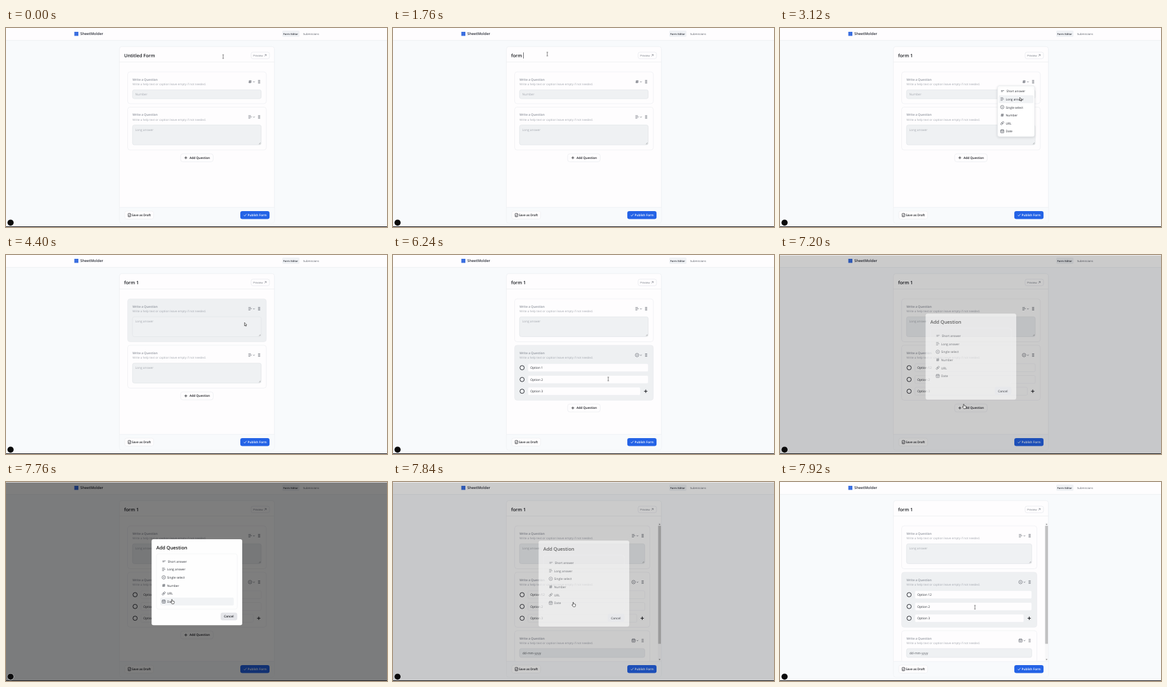
Animation, 600 px wide and 313 px high, one loop 8000 ms. Source, as an HTML page with a canvas:

```html
<!DOCTYPE html>
<html lang="en">
<head>
<meta charset="utf-8">
<title>Form editor</title>
<style>
html, body { margin: 0; width: 100%; height: 100%; overflow: hidden; background: #f8fafc; }
canvas { display: block; width: 600px; height: 313px; }
</style>
</head>
<body>
<canvas id="stage"></canvas>
<script>
const W = 600, H = 313, LOOP = 8000, STEP = 80;
const canvas = document.getElementById('stage');
const c = canvas.getContext('2d');
const ratio = window.devicePixelRatio || 1;
canvas.width = W * ratio;
canvas.height = H * ratio;

const INK = '#16181d', WHITE = '#fefdfe', LINE = '#e9ebef', FIELD = '#eff1f3', HOVER = '#eef0f2';
const TYPES = ['Short answer', 'Long answer', 'Single select', 'Number', 'URL', 'Date'];
const ICONS = ['short', 'long', 'select', 'number', 'link', 'date'];
const HEIGHT = { number: 50, long: 67.5, date: 50 };

// Pointer path: time, x, y, shape from that time on
const PATH = [
  [0, 342, 45, 'beam'], [80, 342, 45, 'beam'], [880, 243, 41, 'beam'],
  [2000, 243, 41, 'beam'], [2160, 262, 50, 'arrow'], [2800, 386, 85, 'hand'],
  [2880, 386, 85, 'arrow'], [3120, 378, 112, 'arrow'], [4400, 376, 109, 'arrow'],
  [4960, 386, 157, 'hand'], [5120, 386, 157, 'arrow'], [5440, 372, 197, 'arrow'],
  [5840, 372, 197, 'arrow'], [6000, 397, 195, 'hand'], [6080, 386, 195, 'beam'],
  [6240, 339, 195, 'beam'], [6480, 250, 178, 'beam'], [6720, 250, 178, 'arrow'],
  [7040, 290, 238, 'hand'], [7280, 290, 238, 'hand'], [7680, 262, 188, 'hand'],
  [7760, 262, 188, 'hand'], [7920, 307, 197, 'beam'], [8000, 307, 197, 'beam']
];

const clamp = v => Math.max(0, Math.min(1, v));
const ease = p => p * p * (3 - 2 * p);

function text(str, x, mid, size, color = INK, weight = 400) {
  c.font = `${weight} ${size}px "Open Sans", "Noto Sans", sans-serif`;
  c.fillStyle = color;
  c.fillText(str, x, mid + size * 0.357);
  return x + c.measureText(str).width;
}

function box(x, y, x2, y2, r, fill, stroke, width = 0.6) {
  c.beginPath();
  c.roundRect(x, y, x2 - x, y2 - y, r);
  if (fill) { c.fillStyle = fill; c.fill(); }
  if (stroke) { c.strokeStyle = stroke; c.lineWidth = width; c.stroke(); }
}

function rect(x, y, w, h, color) {
  c.fillStyle = color;
  c.fillRect(x, y, w, h);
}

function lines(color, width, ...paths) {
  c.strokeStyle = color;
  c.lineWidth = width;
  c.beginPath();
  for (const p of paths)
    for (let i = 0; i < p.length; i += 2) i ? c.lineTo(p[i], p[i + 1]) : c.moveTo(p[i], p[i + 1]);
  c.stroke();
}

function ring(x, y, r, color, width) {
  c.beginPath();
  c.arc(x, y, r, 0, Math.PI * 2);
  c.strokeStyle = color;
  c.lineWidth = width;
  c.stroke();
}

function disc(x, y, r, color) {
  c.beginPath();
  c.arc(x, y, r, 0, Math.PI * 2);
  c.fillStyle = color;
  c.fill();
}

function plus(x, y, r, width) {
  lines(INK, width, [x - r, y, x + r, y], [x, y - r, x, y + r]);
}

const icon = {
  short(x, y, k) { lines(k, 0.65, [x - 2, y - 0.7, x + 3, y - 0.7], [x - 2, y + 0.9, x + 1, y + 0.9]); },
  long(x, y, k) {
    lines(k, 0.65, [x - 2.6, y - 2, x + 1.4, y - 2], [x - 2.6, y, x + 2.6, y], [x - 2.6, y + 2, x + 0.6, y + 2]);
  },
  select(x, y, k) { ring(x, y, 2.7, k, 0.65); disc(x, y, 0.7, k); },
  number(x, y, k) {
    lines(k, 0.65, [x - 2.2, y - 0.9, x + 2.4, y - 0.9], [x - 2.4, y + 0.9, x + 2.2, y + 0.9],
      [x - 0.5, y - 2.4, x - 1.2, y + 2.4], [x + 1.3, y - 2.4, x + 0.6, y + 2.4]);
  },
  link(x, y, k) {
    c.save();
    c.translate(x, y);
    c.rotate(-Math.PI / 4);
    box(-3.1, -1.2, 0.5, 1.2, 1.2, null, k, 0.6);
    box(-0.5, -1.2, 3.1, 1.2, 1.2, null, k, 0.6);
    c.restore();
  },
  date(x, y, k) {
    box(x - 2.5, y - 2.2, x + 2.5, y + 2.6, 0.6, null, k, 0.65);
    lines(k, 0.6, [x - 2.5, y - 0.6, x + 2.5, y - 0.6], [x - 1.1, y - 3, x - 1.1, y - 1.6],
      [x + 1.1, y - 3, x + 1.1, y - 1.6], [x - 1.3, y + 1, x + 1.3, y + 1]);
  }
};

function pointer(t) {
  let i = PATH.length - 2;
  while (i > 0 && PATH[i][0] > t) i--;
  const [t0, x0, y0, shape] = PATH[i], [t1, x1, y1] = PATH[i + 1];
  const p = ease(clamp((t - t0) / (t1 - t0)));
  return { x: x0 + (x1 - x0) * p, y: y0 + (y1 - y0) * p, shape };
}

function drawPointer({ x, y, shape }) {
  if (shape === 'beam') {
    lines('#333', 0.6, [x, y - 2.6, x, y + 2.6], [x - 1.2, y - 2.9, x + 1.2, y - 2.9], [x - 1.2, y + 2.9, x + 1.2, y + 2.9]);
    return;
  }
  c.save();
  c.translate(x, y);
  c.beginPath();
  if (shape === 'arrow') {
    c.moveTo(-0.4, -2.8); c.lineTo(-0.4, 2.4); c.lineTo(0.8, 1.3); c.lineTo(1.6, 3.1);
    c.lineTo(2.4, 2.7); c.lineTo(1.6, 1); c.lineTo(3.2, 1);
  } else {
    c.moveTo(-1.2, -3.2); c.lineTo(-0.2, -3.2); c.lineTo(0, -0.9); c.lineTo(3, -0.2);
    c.lineTo(3, 2); c.lineTo(2.2, 3.7); c.lineTo(-0.7, 3.7); c.lineTo(-2.8, 0.9);
    c.lineTo(-2.3, 0.3); c.lineTo(-1.2, 1.2);
  }
  c.closePath();
  c.fillStyle = '#fff';
  c.fill();
  c.strokeStyle = '#222';
  c.lineWidth = 0.65;
  c.lineJoin = 'round';
  c.stroke();
  c.restore();
}

function typeList(iconX, textX, top, pitch, size) {
  TYPES.forEach((name, i) => {
    const y = top + i * pitch;
    icon[ICONS[i]](iconX, y - 0.2, '#4b4f58');
    text(name, textX + (i ? 0 : 1), y + 0.2, size, '#2b2e35');
  });
}

function titleText(t) {
  const full = 'Untitled Form', next = 'form';
  if (t < 960) return full;
  if (t < 1360) return full.slice(0, Math.max(0, Math.round(10.4 - (t - 960) / STEP * 2.6)));
  if (t < 1760) return next.slice(0, Math.floor((t - 1360) / STEP) + 1);
  return t < 2000 ? 'form ' : 'form 1';
}

function questions(t) {
  const list = [{ type: t < 3280 ? 'number' : 'long' }, { type: t < 5520 ? 'long' : 'select' }];
  if (t >= 7840) list.push({ type: 'date' });
  let top = 69;
  for (const q of list) {
    q.rows = t < 6000 ? 2 : 3;
    q.top = top;
    q.bottom = top + (HEIGHT[q.type] || 31 + q.rows * 18.5);
    top = q.bottom + 5.4;
  }
  return list;
}

function drawOptions(q, t, right) {
  for (let i = 0; i < q.rows; i++) {
    const y = q.top + 35.4 + i * 18.5, last = i === q.rows - 1;
    ring(203.3, y, 3.4, '#25282e', 0.95);
    box(212.5, y - 6.3, last ? right - 12.5 : right, y + 6.3, 2, WHITE, '#eceef1');
    const typed = i === 0 && t >= 6720 ? '2' : '';
    const end = text('Option ' + (i + 1) + typed, 216.2, y + 0.2, 4.9, '#2b2e35');
    if (i === 0 && t >= 6480 && t < 7040) rect(end + 0.3, y - 3, 0.5, 6, INK);
    if (last) plus(right - 4, y, 2.6, 1);
  }
}

function drawQuestion(q, t, shift, hover) {
  const { top, bottom, type } = q, right = 402 - shift;
  box(191.5, top, 410 - shift, bottom, 4, hover ? HOVER : WHITE, hover ? '#e8eaed' : LINE);
  text('Write a Question', 199.2, top + 12, 4.9, '#8d929b', 600);
  text('Write a help text or caption leave empty if not needed.', 199.2, top + 19.7, 4.58, '#a2a6ae');
  const mid = top + 15.5;
  icon[type](384.3 - shift, mid, '#555a63');
  lines('#555a63', 0.6, [389 - shift, mid - 0.6, 390.4 - shift, mid + 0.8, 391.8 - shift, mid - 0.6]);
  for (let i = 0; i < 6; i++)
    disc(397.7 - shift + (i % 2) * 1.8, mid - 2 + Math.floor(i / 2) * 2, 0.65, '#555a63');
  if (type === 'select') return drawOptions(q, t, right);
  const y = top + 28.2, end = y + (type === 'long' ? 31.3 : 14);
  box(199.2, y, right, end, 3, FIELD, '#dfe2e6');
  if (type === 'long') {
    text('Long answer', 203.5, y + 7.3, 4.85, '#a5a9b0');
    lines('#777', 0.5, [right - 3.6, end - 1.2, right - 1.2, end - 3.6], [right - 2.2, end - 1.2, right - 1.2, end - 2.2]);
  } else if (type === 'date') {
    text('dd-mm-yyyy', 204, y + 7.2, 5.1, '#55595f');
  } else {
    text('Number', 203.5, y + 7.3, 4.9, '#a5a9b0');
  }
}

function drawScrollbar() {
  rect(417.3, 64, 5, 218, '#f7f7f8');
  rect(417.6, 69, 4.4, 185.5, '#c1c1c2');
  const x = 419.8;
  for (const [y, d] of [[66.6, -1], [279.2, 1]]) {
    c.beginPath();
    c.moveTo(x - 1.3, y - d * 0.6); c.lineTo(x + 1.3, y - d * 0.6); c.lineTo(x, y + d);
    c.fillStyle = '#777';
    c.fill();
  }
}

function drawFrame(t) {
  rect(0, 0, W, H, '#f8fafc');
  rect(0, 0, W, 19.5, WHITE);
  rect(0, 19.2, W, 0.6, '#e8ebef');
  rect(107.6, 6, 6.4, 6.4, '#3b6fe0');
  text('SheetMolder', 117, 9.3, 5.85, '#2a2e37', 600);
  box(435, 4, 462.3, 14, 2, '#f0f2f5');
  text('Form Editor', 436.6, 9.2, 4.15, '#30343c', 600);
  text('Submissions', 468, 9.2, 4.25, '#50555f');

  box(178.6, 29.2, 422.7, 306.8, 4, WHITE, '#e8ebef');
  box(178.9, 282, 422.4, 306.5, [0, 0, 4, 4], '#f8fafc');
  rect(178.6, 53, 244, 0.6, LINE);
  rect(178.6, 281.8, 244, 0.6, LINE);
  const end = text(titleText(t), 186, 43.5, 7.25, INK, 600);
  if (t >= 880 && t < 2160) rect(end + 0.3, 38.4, 0.6, 9.6, INK);

  box(386, 38, 415, 48.3, 3, WHITE, '#e1e4e9');
  text('Preview', 389.2, 43.2, 4.25, '#777c85');
  lines('#666b75', 0.55, [406.9, 44.6, 409.7, 41.8], [407.4, 41.7, 409.8, 41.7, 409.8, 44.1]);
}

function drawFooter() {
  box(187, 288, 232.5, 300.5, 3.2, WHITE, LINE);
  box(192.3, 291.7, 196.4, 296.9, 0.6, null, INK, 0.65);
  lines(INK, 0.6, [193.4, 294.9, 195.9, 292.6], [193.3, 295.8, 195.4, 295.8]);
  text('Save as Draft', 197.9, 294.4, 4.8, INK, 600);
  box(369, 288, 415, 300.5, 3.2, '#2463e6');
  lines('#fff', 0.75, [374.6, 294.4, 375.9, 295.8, 378.7, 292.6]);
  text('Publish Form', 380.5, 294.4, 4.75, '#fff', 600);
}

function drawMenu(top, p) {
  c.save();
  c.shadowColor = 'rgba(0,0,0,.12)';
  c.shadowBlur = 4 * ratio;
  c.shadowOffsetY = ratio;
  box(342.5, top + 22, 401, top + 102, 3, '#fff', '#e3e6ea');
  c.restore();
  const row = Math.floor((p.y - top - 24) / 12.65);
  if (row >= 0 && row < 6) box(344.5, top + 24 + row * 12.65, 399, top + 36.6 + row * 12.65, 2, '#f1f3f5');
  typeList(350, 355.5, top + 30.3, 12.65, 4.8);
}

function drawDialog(show, p) {
  c.fillStyle = `rgba(0,0,0,${0.5 * show})`;
  c.fillRect(0, 0.7, W, H);
  c.save();
  c.globalAlpha = Math.min(1, show * 1.6);
  c.translate(0, 3.7 * (1 - show));
  box(229.3, 90, 372, 225.2, 3, '#fefefe');
  text('Add Question', 236.8, 103, 7.4, '#111', 600);
  box(237, 113, 364.2, 200, 3, null, '#eff0f2');
  const row = Math.floor((p.y - 118.4) / 12.65);
  if (show === 1 && row >= 0 && row < 6)
    box(243, 118.6 + row * 12.65, 358.7, 131 + row * 12.65, 2, '#f1f3f5');
  typeList(248.4, 253.7, 124.9, 12.65, 4.85);
  box(338, 205.5, 364.2, 217.6, 3, '#e5e6ea');
  text('Cancel', 343.2, 211.6, 4.8, INK, 600);
  c.restore();
}

function draw(t) {
  c.setTransform(ratio, 0, 0, ratio, 0, 0);
  c.textRendering = 'geometricPrecision';
  c.lineCap = 'butt';
  const p = pointer(t), list = questions(t);
  const show = Math.min(clamp((t - 7080) / 300), clamp((7880 - t) / 100));
  const dialog = t < 7900 ? show : 0;
  const menu = t >= 2880 && t < 3280 ? 0 : t >= 5120 && t < 5520 ? 1 : -1;
  const shift = list.length > 2 ? 5.5 : 0;

  drawFrame(t);
  c.save();
  c.beginPath();
  c.rect(178, 54, 246, 227.8);
  c.clip();
  for (const q of list) {
    const hover = menu < 0 && !dialog && p.x > 191 && p.x < 410 - shift && p.y > q.top && p.y < q.bottom;
    drawQuestion(q, t, shift, hover);
  }
  const y = list[list.length - 1].bottom + 12.2;
  box(275, y - 6.3, 326.3, y + 6.3, 3.5, WHITE, '#e6e8ec');
  plus(283.2, y, 2.2, 0.75);
  text('Add Question', 288.9, y + 0.1, 4.9, INK, 600);
  if (shift) drawScrollbar();
  c.restore();
  drawFooter();

  if (menu >= 0) drawMenu(list[menu].top, p);
  if (dialog) drawDialog(dialog, p);
  disc(7.2, 306.2, 5.2, '#d9dadd');
  disc(7.2, 306.2, 4.8, '#0b0b0c');
  rect(0, 312, W, 1, '#1d1d20');
  drawPointer(p);
}

const start = performance.now();
function tick(now) {
  const t = Math.max(0, now - start) % LOOP;
  draw(Math.floor(t / STEP) * STEP);
  requestAnimationFrame(tick);
}
draw(0);
requestAnimationFrame(tick);
</script>
</body>
</html>
```
